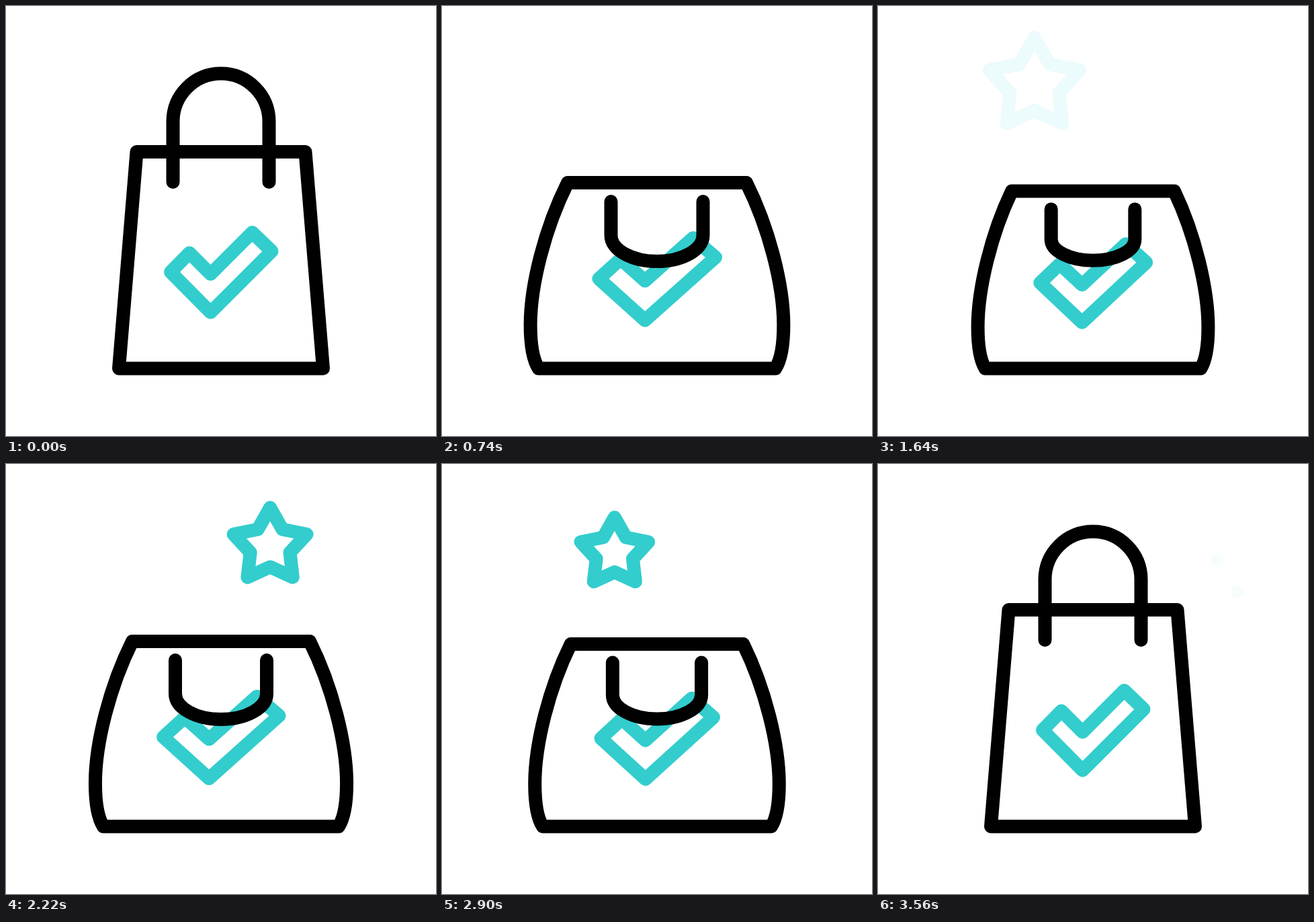
An HTML page with a canvas that plays this animation: 640x640 px, repeating every 3.6 s.

```html
<!DOCTYPE html>
<html lang="en">
<head>
<meta charset="utf-8">
<title>Shopping bag</title>
<style>
  html, body { margin: 0; width: 100%; height: 100%; overflow: hidden; background: #fff; }
  canvas { display: block; width: 640px; height: 640px; }
</style>
</head>
<body>
<canvas id="stage" width="640" height="640"></canvas>
<script>
const ctx = document.getElementById('stage').getContext('2d');
const LOOP = 3600, BEAT = 740, FLOOR = 539.5, MID = 320;
const BLACK = '#000', TEAL = '#33cdcd';

const clamp = v => Math.max(0, Math.min(1, v));
const lerp = (a, b, p) => a + (b - a) * p;
const progress = (t, from, to) => clamp((t - from) / (to - from));
const smooth = p => (1 - Math.cos(Math.PI * p)) / 2;
const hump = p => Math.sin(Math.PI * p) ** 2;

// Smooth curve through [time, value] keys that never overshoots.
function curve(keys) {
  const slope = i => (keys[i + 1][1] - keys[i][1]) / (keys[i + 1][0] - keys[i][0]);
  const tangents = keys.map((_, i) => {
    if (i === 0) return slope(0);
    if (i === keys.length - 1) return slope(i - 1);
    const a = slope(i - 1), b = slope(i);
    return a * b <= 0 ? 0 : 2 * a * b / (a + b);
  });
  return t => {
    let i = 0;
    while (i < keys.length - 2 && t > keys[i + 1][0]) i++;
    const [t0, v0] = keys[i], [t1, v1] = keys[i + 1];
    const d = t1 - t0, u = clamp((t - t0) / d), w = 1 - u;
    return v0 * (1 + 2 * u) * w * w + v1 * u * u * (3 - 2 * u)
      + d * (tangents[i] * u * w * w - tangents[i + 1] * u * u * w);
  };
}

// Right half of the bag as offsets from the middle: top corner, side curve, bottom corner.
const TALL = {
  side: [[125.5, 217], [125.5, 217], [136.4, 350], [136.4, 350], [136.4, 350], [152, 539.5], [152, 539.5]],
  handle: [71.5, 262, 172, 100.5],   // half width, end, shoulder, arc
  check: [1, 337, 1]                 // x scale, top, y scale
};
const WIDE = {
  side: [[132, 264], [165, 330], [187, 415], [187, 475], [187, 505], [183, 527], [175, 539.5]],
  handle: [68, 292, 342, 380],
  check: [1.145, 346, 1.025]
};
const CHECK = [[-75, 396], [-47, 367.5], [-15.5, 399], [46.5, 337], [75.5, 365], [-15.5, 456]];

const puff = curve([[0, 1.07], [140, .21], [200, 0], [480, 0], [660, .73], [720, 1], [740, 1.07]]);
const starX = curve([[-220, 0], [0, 15], [300, 63], [360, 73], [520, 87], [560, 90]]);
const starY = curve([[-220, 305], [0, 211], [300, 132.5], [360, 122.3], [520, 117.5], [560, 117]]);

function widePose(t) {
  const beat = t > 760 && t < 2980 ? (t - 760) % BEAT : 0;
  const slim = 1 - puff(beat);
  const fx = 1 - .105 * slim, fy = 1 - .053 * slim;
  const y = v => FLOOR + (v - FLOOR) * fy;
  const [w, end, shoulder, arc] = WIDE.handle, [sx, top, sy] = WIDE.check;
  return {
    side: WIDE.side.map(([px, py]) => [px * fx, y(py)]),
    handle: [w * fx, y(end), y(shoulder) - 4 * slim, y(arc) - 10 * slim],
    check: [sx * fx, y(top), sy * fy]
  };
}

function bagPose(t) {
  const wide = widePose(t);
  const m = smooth(progress(t, 175, 670)) - smooth(progress(t, 2980, 3400));
  const mix = (a, b) => a.map((v, i) => lerp(v, b[i], m));
  return {
    side: TALL.side.map((p, i) => mix(p, wide.side[i])),
    handle: mix(TALL.handle, wide.handle),
    check: mix(TALL.check, wide.check)
  };
}

function stroke(color) {
  ctx.strokeStyle = color;
  ctx.stroke();
}

function polygon(points) {
  ctx.beginPath();
  points.forEach(([x, y]) => ctx.lineTo(x, y));
  ctx.closePath();
  stroke(TEAL);
}

function drawBag({ side, handle, check }) {
  const [sx, top, sy] = check;
  polygon(CHECK.map(([x, y]) => [MID + x * sx, top + (y - 337) * sy]));

  const right = side.map(([x, y]) => [MID + x, y]);
  const left = side.map(([x, y]) => [MID - x, y]).reverse();
  ctx.beginPath();
  ctx.moveTo(...right[0]);
  ctx.bezierCurveTo(...right[1], ...right[2], ...right[3]);
  ctx.bezierCurveTo(...right[4], ...right[5], ...right[6]);
  ctx.lineTo(...left[0]);
  ctx.bezierCurveTo(...left[1], ...left[2], ...left[3]);
  ctx.bezierCurveTo(...left[4], ...left[5], ...left[6]);
  ctx.closePath();
  stroke(BLACK);

  const [w, end, shoulder, arc] = handle;
  const bend = lerp(shoulder, arc, .552), k = w * .552;
  ctx.beginPath();
  ctx.moveTo(MID - w, end);
  ctx.lineTo(MID - w, shoulder);
  ctx.bezierCurveTo(MID - w, bend, MID - k, arc, MID, arc);
  ctx.bezierCurveTo(MID + k, arc, MID + w, bend, MID + w, shoulder);
  ctx.lineTo(MID + w, end);
  stroke(BLACK);
}

function drawStar(s, direction) {
  if (s < -220 || s > 540) return;
  const radius = 35.2 + .046 * s + .0000423 * s * s;
  const cx = MID + direction * starX(s), cy = starY(s);
  ctx.globalAlpha = 1 - progress(s, 380, 535);
  polygon(Array.from({ length: 10 }, (_, i) => {
    const r = i % 2 ? radius * .54 : radius, a = i * Math.PI / 5;
    return [cx + r * Math.sin(a), cy - r * Math.cos(a)];
  }));
  ctx.globalAlpha = 1;
}

function drawDash(t, x0, y0, x1, y1) {
  if (t < 3220) return;
  const head = 1 - (1 - progress(t, 3220, 3420)) ** 2;
  const tail = smooth(progress(t, 3320, 3550));
  ctx.globalAlpha = 1 - .96 * progress(t, 3460, 3560);
  ctx.beginPath();
  ctx.moveTo(lerp(x0, x1, tail), lerp(y0, y1, tail));
  ctx.lineTo(lerp(x0, x1, head), lerp(y0, y1, head));
  stroke(TEAL);
  ctx.globalAlpha = 1;
}

function draw(t) {
  const bag = bagPose(t);
  const lift = 43 * (hump(progress(t, 100, 600)) + hump(progress(t, 3030, 3440)));
  ctx.fillStyle = '#fff';
  ctx.fillRect(0, 0, 640, 640);
  ctx.lineWidth = 20;
  ctx.lineCap = ctx.lineJoin = 'round';

  // Stars stay hidden while they are inside the bag.
  ctx.save();
  ctx.beginPath();
  ctx.rect(0, 0, 640, bag.side[0][1] - lift);
  ctx.clip();
  [-1, 1, -1].forEach((direction, i) => drawStar(t - 1120 - i * BEAT, direction));
  ctx.restore();

  drawDash(t, 468, 177, 505, 143);
  drawDash(t, 487, 206, 535, 190);

  ctx.save();
  ctx.translate(0, -lift);
  drawBag(bag);
  ctx.restore();
}

function tick() {
  draw(performance.now() % LOOP);
  requestAnimationFrame(tick);
}
tick();
</script>
</body>
</html>
```
